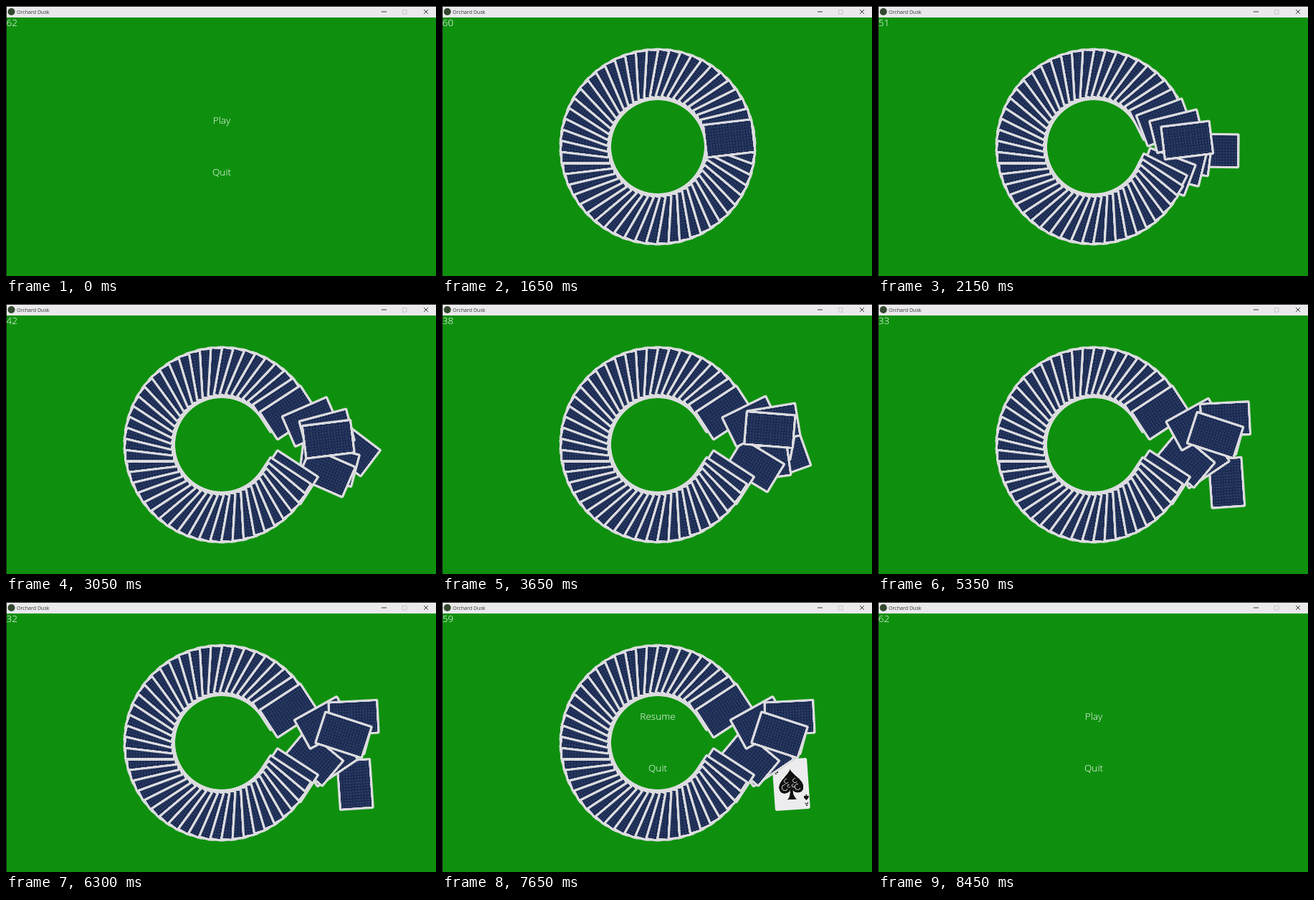
Recreate the animation shown at these times as an HTML page with a canvas. Size 600 by 376 pixels, loop 8.5 s.

```html
<!DOCTYPE html>
<html lang="en">
<head>
<meta charset="utf-8">
<title>Orchard Dusk</title>
<style>
  html, body { margin: 0; width: 100%; height: 100%; overflow: hidden; background: #0e900e; }
  canvas { display: block; width: 600px; height: 376px; }
</style>
</head>
<body>
<canvas id="stage"></canvas>
<script>
const LOOP = 8500, STEP = 50;
const DEAL = 500, DRAG = 1650, FLIP = 6400, PAUSE = 7050, LEAVE = 7750;
const COUNT = 54, CENTER = { x: 301, y: 196 }, RADIUS = 100.4;
const CARD = { w: 71, h: 49 };
const RAD = Math.PI / 180;

// Cards near the gap, by place left or right of it: first pushed aside, then dropped on a spot
const loose = {
  '-3': { push: 30, x: 438, y: 163, angle: -29, sag: 5 },
  '-2': { push: 49, x: 480, y: 154, angle: -3, sag: 7 },
  '-1': { push: 49, x: 466, y: 160, angle: 18, sag: 25 },
  0: { push: 80, x: 482, y: 200, angle: 86, sag: 54, start: 2050 },
  1: { push: 46, x: 468, y: 162, angle: 15, sag: 19 },
  2: { push: 56, x: 445, y: 216, angle: -34, sag: 3 },
  3: { push: 52, x: 425, y: 214, angle: 40, sag: 3 }
};
const EDGE = 4;

const scale = Math.max(1, window.devicePixelRatio || 1);
const stage = document.getElementById('stage');
stage.width = 600 * scale;
stage.height = 376 * scale;
const ctx = stage.getContext('2d');

const mix = (a, b, k) => a + (b - a) * k;
function ease(t, start, end) {
  const k = Math.min(1, Math.max(0, (t - start) / (end - start)));
  return k * k * (3 - 2 * k);
}

// The frame rate sinks while cards are dragged and recovers in the menus
function fpsAt(t) {
  if (t < DEAL) return 62;
  if (t < DRAG) return 60;
  if (t < PAUSE) return Math.floor(32 + 28 * Math.exp((DRAG - t) / 1361));
  return Math.floor(62.5 - 30 * Math.exp((PAUSE - t) / 260));
}

function poseAt(i, t) {
  const place = i > COUNT / 2 ? i - COUNT : i;
  const home = place * 360 / COUNT, steps = Math.abs(place);
  let x = CENTER.x + RADIUS * Math.cos(home * RAD);
  let y = CENTER.y + RADIUS * Math.sin(home * RAD);
  let angle = home;
  if (steps <= EDGE) {
    const spot = loose[place], push = spot ? spot.push : 4;
    const moved = ease(t, 1700 + 100 * steps, 2300 + 100 * steps);
    x += push * moved;
    y += push * 0.08 * moved;
    angle *= 1 + 0.06 * steps * moved;
    if (spot) {
      const dropped = ease(t, spot.start || 3100, 4250);
      const sunk = ease(t, 4300, 5600);
      x = mix(x, spot.x, dropped) + 5 * sunk;
      y = mix(y, spot.y, dropped) + spot.sag * sunk;
      angle = mix(angle, spot.angle, dropped);
    }
  }
  return { x, y, angle };
}

// Renders a card face once, with the origin at its middle
function makeFace(paint) {
  const face = document.createElement('canvas'), k = 3 * scale;
  face.width = CARD.w * k;
  face.height = CARD.h * k;
  const g = face.getContext('2d');
  g.scale(k, k);
  g.translate(CARD.w / 2, CARD.h / 2);
  g.beginPath();
  g.roundRect(-CARD.w / 2, -CARD.h / 2, CARD.w, CARD.h, 2.5);
  g.clip();
  paint(g);
  return face;
}

function paintBack(g) {
  const w = CARD.w - 6.6, h = CARD.h - 6.6;
  g.fillStyle = '#dcdcdf';
  g.fillRect(-CARD.w / 2, -CARD.h / 2, CARD.w, CARD.h);
  g.fillStyle = '#1f2f57';
  g.fillRect(-w / 2, -h / 2, w, h);
  g.lineWidth = 0.8;
  g.strokeStyle = '#374870';
  g.beginPath();
  for (let x = -w / 2 + 2; x < w / 2; x += 4) { g.moveTo(x, -h / 2); g.lineTo(x, h / 2); }
  g.stroke();
  g.strokeStyle = '#17244a';
  g.beginPath();
  for (let y = -h / 2 + 2; y < h / 2; y += 4) { g.moveTo(-w / 2, y); g.lineTo(w / 2, y); }
  g.stroke();
}

function spade(g, x, y, size) {
  g.save();
  g.translate(x, y);
  g.scale(size, size);
  g.beginPath();
  g.moveTo(0, -21);
  g.bezierCurveTo(4, -12, 17, -6, 17, 4);
  g.bezierCurveTo(17, 14, 5, 14, 2, 8);
  g.quadraticCurveTo(2, 18, 7, 21);
  g.lineTo(-7, 21);
  g.quadraticCurveTo(-2, 18, -2, 8);
  g.bezierCurveTo(-5, 14, -17, 14, -17, 4);
  g.bezierCurveTo(-17, -6, -4, -12, 0, -21);
  g.fill();
  g.restore();
}

function paintAce(g) {
  g.fillStyle = '#ececee';
  g.fillRect(-CARD.w / 2, -CARD.h / 2, CARD.w, CARD.h);
  g.rotate(-Math.PI / 2);
  g.fillStyle = '#111';
  spade(g, 0, 0, 1);
  g.strokeStyle = '#c8c8ca';
  g.lineWidth = 0.9;
  for (const side of [-1, 1]) {
    for (let r = 2; r <= 4; r++) {
      g.beginPath();
      g.arc(side * (3 * r - 3), r % 2 ? -5 : r, r, 0.5, 5);
      g.stroke();
    }
  }
  g.font = '8px "Open Sans", sans-serif';
  g.textAlign = 'center';
  for (let turn = 0; turn < 2; turn++) {
    g.fillText('A', -20, -26);
    spade(g, -20, -19.5, 0.2);
    g.rotate(Math.PI);
  }
}

const back = makeFace(paintBack), ace = makeFace(paintAce);

function drawCard(i, t) {
  const { x, y, angle } = poseAt(i, t);
  ctx.save();
  ctx.translate(x, y);
  ctx.rotate(angle * RAD);
  ctx.drawImage(i === 0 && t >= FLIP ? ace : back, -CARD.w / 2, -CARD.h / 2, CARD.w, CARD.h);
  ctx.restore();
}

function label(text, x, y, font, color, align) {
  ctx.font = `${font} "Open Sans", "Noto Sans", sans-serif`;
  ctx.fillStyle = color;
  ctx.textAlign = align;
  ctx.fillText(text, x, y);
}

function drawMenu(first) {
  label(first, 301, 164, '300 13.6px', '#fff', 'center');
  label('Quit', 301, 236, '300 13.6px', '#fff', 'center');
}

function drawWindow() {
  ctx.fillStyle = '#ebe9ec';
  ctx.fillRect(0, 0, 600, 16);
  ctx.fillStyle = '#222';
  ctx.fillRect(0, 0, 600, 1);
  ctx.fillRect(0, 0, 1, 376);
  ctx.fillStyle = '#34482f';
  ctx.beginPath();
  ctx.arc(7.5, 8, 5, 0, 7);
  ctx.fill();
  label('Orchard Dusk', 15, 10.8, '7.1px', '#333', 'left');
  ctx.lineWidth = 0.9;
  ctx.strokeStyle = '#222';
  ctx.beginPath();
  ctx.moveTo(524, 8); ctx.lineTo(531, 8);
  ctx.moveTo(583, 5); ctx.lineTo(589, 11);
  ctx.moveTo(589, 5); ctx.lineTo(583, 11);
  ctx.stroke();
  ctx.strokeStyle = '#c4c2c5';
  ctx.strokeRect(553.5, 5.5, 5.5, 5.5);
}

function draw(t) {
  ctx.setTransform(scale, 0, 0, scale, 0, 0);
  ctx.fillStyle = '#0e900e';
  ctx.fillRect(0, 0, 600, 376);
  const playing = t >= DEAL && t < LEAVE;
  if (playing) for (let i = 0; i < COUNT; i++) drawCard(i, t);
  if (!playing) drawMenu('Play');
  else if (t >= PAUSE) drawMenu('Resume');
  drawWindow();
  label(fpsAt(t), 0.5, 28, '300 13.6px', '#fff', 'left');
}

const begin = performance.now();
function tick() {
  const t = (performance.now() - begin) % LOOP;
  draw(Math.floor(t / STEP) * STEP);
  requestAnimationFrame(tick);
}
tick();
</script>
</body>
</html>
```
